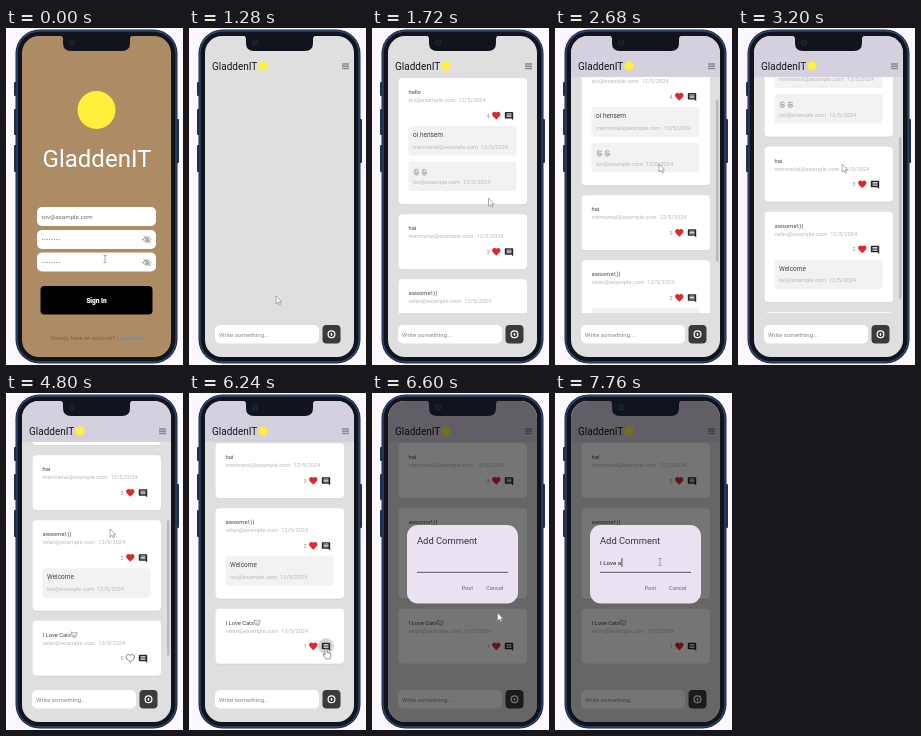
An HTML page for the animation above (8 s loop, 177 by 337 pixels).

```html
<!DOCTYPE html>
<html lang="en">
<head>
<meta charset="utf-8">
<title>Phone app demo</title>
<style>
  html, body { margin: 0; width: 100%; height: 100%; overflow: hidden; background: #fdf8ff; }
  svg { display: block; width: 100%; height: 100%; font-family: Roboto, "Open Sans", sans-serif; }
  text { white-space: pre; }
  .meta { font-size: 5.7px; fill: #b9b9b9; }
  .line { fill: none; stroke-linecap: round; stroke-linejoin: round; }
</style>
</head>
<body>
<svg viewBox="0 0 177 337">
  <defs>
    <clipPath id="screen"><rect x="16" y="8" width="149" height="321" rx="17"/></clipPath>
    <clipPath id="list"><rect x="16" y="49" width="149" height="236"/></clipPath>
    <path id="heart" transform="scale(.42) translate(-12 -12)" d="M12 21.35l-1.45-1.32C5.4 15.36 2 12.28 2 8.5 2 5.42 4.42 3 7.5 3c1.74 0 3.41.81 4.5 2.09C13.09 3.81 14.76 3 16.5 3 19.58 3 22 5.42 22 8.5c0 3.78-3.4 6.86-8.55 11.54z"/>
    <g id="chat">
      <path d="M-4.200-3.200Q-4.200-4-3.400-4H3.400Q4.200-4 4.200-3.200V4.200L2.500 2.500H-3.400Q-4.200 2.500-4.200 1.700Z" fill="#262626"/>
      <path d="M-2.500-2.200H2.500M-2.500-.8H2.500M-2.500.6H2.500" stroke="#fff" stroke-width=".8"/>
    </g>
    <g id="hidden" class="line" stroke="#85817e" stroke-width=".8">
      <path d="M-4 0Q0-5.6 4 0Q0 5.6-4 0ZM-3.2-3.4L3.4 3.4"/><circle r="1.4"/>
    </g>
    <path id="dots" class="line" d="M0 0H17.5" stroke="#777" stroke-width="1.2" stroke-dasharray="0 2.4"/>
    <path id="cat" class="line" d="M-2.5-2.8L-1-1.9H1L2.5-2.8V.6Q2 2.6 0 2.6T-2.5.6ZM-1 0V.3M1 0V.3M-.7 1.3H.7" stroke="#777" stroke-width=".6"/>
    <path id="laugh" class="line" d="M-2.2-2.6Q0-4 2-2.4M2.2 0A2.3 2.3 0 1 1-1-2M-1 .6Q.2 1.6 1.2.3M-.8-.6H1" stroke="#777" stroke-width=".6"/>
  </defs>

  <g fill="#22314f">
    <rect x="8" y="54" width="3" height="14" rx="1"/>
    <rect x="8" y="81" width="3" height="26" rx="1"/>
    <rect x="8" y="117" width="3" height="27" rx="1"/>
    <rect x="170" y="91" width="3" height="44" rx="1"/>
  </g>
  <rect x="9.500" y="1.500" width="162" height="334" rx="24" fill="#1a2740"/>
  <rect x="11" y="3" width="159" height="331" rx="22.500" fill="#11141c" stroke="#2d4874" stroke-width="1.300"/>

  <g clip-path="url(#screen)">
    <g id="login">
      <rect x="16" y="8" width="149" height="321" fill="#ad8c65"/>
      <circle cx="90.500" cy="82" r="19" fill="#fff03c"/>
      <text x="91" y="138.500" font-size="24" fill="#fff" text-anchor="middle">GladdenIT</text>
      <g fill="#fff">
        <rect x="31" y="179" width="119" height="19" rx="5"/>
        <rect x="31" y="202" width="119" height="19" rx="5"/>
        <rect x="31" y="224.500" width="119" height="19" rx="5"/>
      </g>
      <text x="35.500" y="191" font-size="6.200" fill="#707070">tov@example.com</text>
      <use href="#dots" x="36.500" y="211.500"/><use href="#hidden" x="141" y="211.500"/>
      <use href="#dots" x="36.500" y="234.500"/><use href="#hidden" x="141" y="234.500"/>
      <rect x="34.500" y="258" width="112" height="28.500" rx="4" fill="#000"/>
      <text x="90.500" y="274.500" font-size="6.500" font-weight="700" fill="#fff" stroke="#fff" stroke-width=".2" text-anchor="middle">Sign In</text>
      <text x="44" y="311.700" font-size="5.750" fill="#756450">Already have an account? <tspan fill="#4c8fd2">Login here</tspan></text>
    </g>

    <g id="feed">
      <rect x="16" y="8" width="149" height="321" fill="#dfdfdf"/>
      <g clip-path="url(#list)">
        <g id="posts"></g>
        <rect id="thumb" x="161" width="2.500" fill="#b9b9bc"/>
      </g>
      <rect id="tint" x="16" y="8" width="149" height="41" fill="#d4d0dd"/>
      <text x="23" y="41.500" font-size="10" fill="#151515">GladdenIT</text>
      <circle cx="74" cy="38" r="4.600" fill="#fff03c"/>
      <path d="M153 36H160M153 38.200H160M153 40.400H160" stroke="#8b8b8e" stroke-width="1.500"/>
      <rect x="26" y="297" width="104" height="18.500" rx="5" fill="#fff"/>
      <text x="30" y="308.500" font-size="6.200" fill="#888">Write something...</text>
      <rect x="133.500" y="297" width="18" height="18.500" rx="4" fill="#3b3b3b"/>
      <g class="line" stroke="#fff">
        <circle cx="142.500" cy="306.300" r="3.400" stroke-width="1.200"/>
        <path d="M142.500 307.600V305.500M141.500 306.200L142.500 305.200L143.500 306.200" stroke-width=".9"/>
      </g>
    </g>

    <rect id="shade" x="16" y="8" width="149" height="321"/>
    <g id="dialog">
      <rect x="35" y="132" width="111" height="78.500" rx="11" fill="#ebe2f1"/>
      <text x="45" y="150.500" font-size="9.400" fill="#333038">Add Comment</text>
      <text id="typed" x="45" y="172" font-size="6.200" fill="#222"></text>
      <rect id="caret" y="165" width=".9" height="9" fill="#333"/>
      <path d="M45 179.300H136" stroke="#4a4650" stroke-width=".9"/>
      <g font-size="5.700" fill="#6d6779"><text x="89.500" y="197">Post</text><text x="114" y="197">Cancel</text></g>
    </g>
  </g>

  <path d="M54 7.500Q57 8 57 11V15Q57 23 65 23H116Q124 23 124 15V11Q124 8 127 7.500Z" fill="#11141c"/>
  <circle cx="66" cy="14.500" r="2.800" fill="#171c2a" stroke="#272e40" stroke-width=".7"/>

  <g id="cursor">
    <path id="arrow" d="M0 0V8L2 6.300L3.300 9L4.500 8.400L3.300 5.800H5.700Z" fill="#fff" stroke="#777" stroke-width=".6"/>
    <path id="hand" d="M-1 .3Q0-.8 1 .3V3.500L4.800 4.500V7.500L4 10H0L-3 6L-2.300 5L-1 6Z" fill="#fff" stroke="#555" stroke-width=".6"/>
    <path id="beam" d="M-1.500-3.500H1.500M0-3.500V3.500M-1.500 3.500H1.500" stroke="#888" stroke-width=".7"/>
  </g>
</svg>

<script>
const LOOP = 8000, STEP = 40;
const $ = id => document.getElementById(id);
const set = (id, name, value) => $(id).setAttribute(name, value);
const show = (id, on) => set(id, "opacity", +on);
const label = (x, y, size, fill, text) =>
  `<text x="${x}" y="${y}" font-size="${size}" fill="${fill}">${text}</text>`;
const meta = (x, y, who, date) =>
  `<text class="meta" x="${x}" y="${y}">${who}<tspan dx="3">${date}</tspan></text>`;
const icon = (name, x, y, extra = "") => `<use href="#${name}" x="${x}" y="${y}" ${extra}/>`;

const RED = "#dd2a31";
const TOV = "tov@example.com", MERROW = "merrowtal@example.com", VELAN = "velan@example.com";
const posts = [
  { text: "hello", who: TOV, date: "12/5/2024", likes: 4,
    comments: [
      { who: MERROW, text: "oi hensem" },
      { who: TOV, art: icon("laugh", 44.5, 11) + icon("laugh", 52.5, 11) }
    ] },
  { text: "hai", who: MERROW, date: "12/5/2024", likes: 3, comments: [] },
  { text: "awsome!:))", who: VELAN, date: "12/5/2024", likes: 2,
    comments: [{ who: TOV, text: "Welcome" }] },
  { text: "I Love Cats", who: VELAN, date: "13/5/2024", likes: 0, comments: [], last: true }
];

function comment({ who, text, art }, i) {
  return `<g transform="translate(0 ${48 + 35.6 * i})">
    <rect x="36.500" width="108" height="29.500" rx="3" fill="#f2f2f2"/>
    ${art || label(41, 11.3, 6.5, "#444", text)}${meta(41, 22.8, who, "12/5/2024")}</g>`;
}

function card(post, top) {
  const height = 55 + 35.6 * post.comments.length;
  const heart = post.last
    ? icon("heart", 124.3, 37.5, 'id="like" stroke="#555" stroke-width="1.800"')
    : icon("heart", 124.3, 37.5, `fill="${RED}"`);
  return `<g transform="translate(0 ${top})">
    <rect x="26.500" y=".7" width="128.500" height="${height}" rx="4" fill="#cfcfcf"/>
    <rect x="26.500" width="128.500" height="${height}" rx="4" fill="#fff"/>
    ${label(36.5, 16, 5.8, "#444", post.text)}${meta(36.5, 24, post.who, post.date)}
    ${post.last ? icon("cat", 68.3, 14) + '<circle id="ring" cx="137" cy="37.500" r="8" fill="#d6d6d6"/>' : ""}
    <text ${post.last ? 'id="likes"' : ""} x="114.500" y="39.700" font-size="5.600" fill="#a08a8c">${post.likes}</text>
    ${heart}${icon("chat", 137, 38)}${post.comments.map(comment).join("")}</g>`;
}

let nextTop = 0;
$("posts").innerHTML = posts.map(post => {
  const markup = card(post, nextTop);
  nextTop += 65 + 35.6 * post.comments.length;
  return markup;
}).join("");

// Progress through a run of steps; the first step already shows a change.
const ramp = (t, start, end) =>
  Math.min(1, Math.max(0, (t - start + STEP) / (end - start + STEP)));
const easeOut = p => 1 - (1 - p) ** 2;

const wheel = [[2680, 2760, 34], [3080, 3200, 33.5], [4480, 4560, 34], [4640, 4800, 22.5], [5080, 5080, 12]];
const scrollAt = t => wheel.reduce((sum, [start, end, dist]) => sum + dist * easeOut(ramp(t, start, end)), 0);

const moves = [
  { start: 320, end: 520, via: [25, 252], to: [87, 267], during: "arrow", after: "hand" },
  { start: 1280, end: 1280, via: [87, 268], to: [87, 268], during: "arrow", after: "arrow" },
  { start: 1520, end: 1800, via: [140, 205], to: [104, 136], during: "arrow", after: "arrow" },
  { start: 5280, end: 5600, via: [86, 200], to: [124, 255], during: "arrow", after: "hand" },
  { start: 5960, end: 6040, via: [130, 255], to: [137, 256], during: "hand", after: "hand" },
  { start: 6520, end: 6800, via: [122, 205], to: [105, 169], during: "arrow", after: "beam" }
];

function cursorAt(t) {
  let at = [99, 231], shape = "beam";
  for (const m of moves) {
    const p = ramp(t, m.start, m.end);
    if (!p) break;
    at = at.map((a, i) => (1 - p) ** 2 * a + 2 * p * (1 - p) * m.via[i] + p * p * m.to[i]);
    shape = p < 1 ? m.during : m.after;
  }
  return { at, shape };
}

const typing = [[7200, "I"], [7520, "I Lo"], [7600, "I Lov"], [7680, "I Love"], [7760, "I Love a"]];

function draw(time) {
  const t = Math.floor(time / STEP) * STEP;

  show("login", t < 1280);
  show("feed", t >= 1280);
  set("posts", "opacity", ramp(t, 1320, 1360));

  const scroll = scrollAt(t);
  set("posts", "transform", `translate(0 ${50 - scroll})`);

  // The list is measured lazily: the thumb shrinks once the last post is reached.
  const measured = t >= 4480;
  set("thumb", "height", measured ? 135 : 161);
  set("thumb", "y", 58 + scroll * (measured ? 0.56 : 0.76));
  set("thumb", "opacity", t < 2680 ? 0 : t < 3720 ? 1 : measured ? 1 - ramp(t, 5280, 5480) : 0);
  show("tint", t >= 2680);

  const liked = t >= 5920;
  set("like", "fill", liked ? RED : "#fff");
  set("like", "stroke-opacity", liked ? 0 : 1);
  $("likes").textContent = +liked;
  show("ring", t >= 6240 && t < 6440);

  const open = ramp(t, 6280, 6440);
  set("shade", "opacity", 0.54 * open);
  set("dialog", "opacity", open);

  const text = typing.reduce((now, [start, value]) => t >= start ? value : now, "");
  $("typed").textContent = text;
  set("caret", "x", 45.3 + (text ? $("typed").getComputedTextLength() : 0));
  show("caret", t >= 7040);

  const { at, shape } = cursorAt(t);
  set("cursor", "transform", `translate(${at})`);
  for (const name of ["arrow", "hand", "beam"]) show(name, name === shape);
}

const begin = performance.now();
function tick() {
  draw((performance.now() - begin) % LOOP);
  requestAnimationFrame(tick);
}
tick();
</script>
</body>
</html>
```
